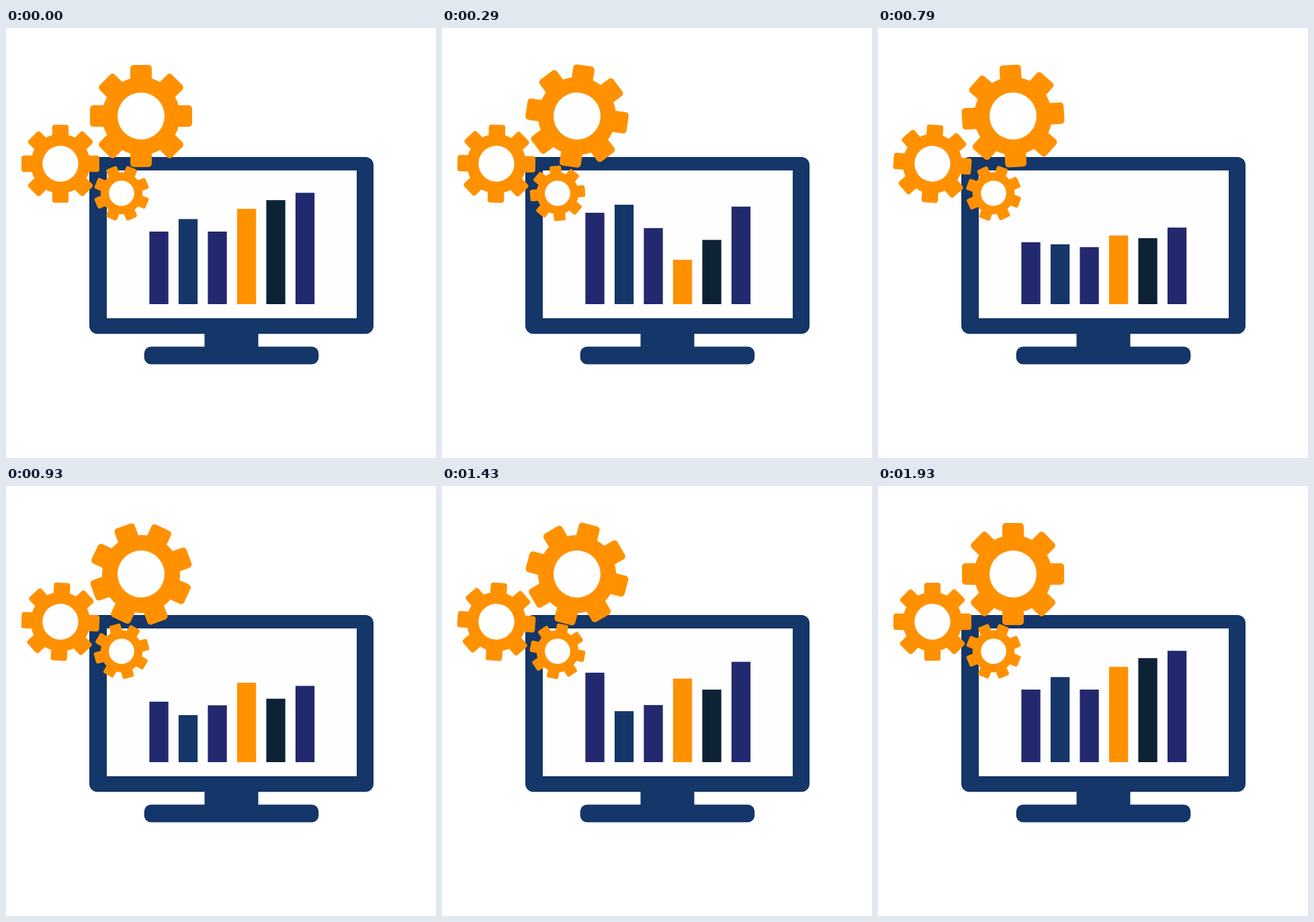
Recreate the animation shown at these times as an HTML page. Size 640 px wide and 640 px high, loop 2 s.

```html
<!DOCTYPE html>
<html lang="en">
<head>
<meta charset="utf-8">
<title>Dashboard</title>
<style>
html, body { margin: 0; width: 100%; height: 100%; overflow: hidden; background: #fff; }
svg { display: block; width: 100vw; height: 100vh; }
</style>
</head>
<body>
<svg id="stage" viewBox="0 0 640 640">
  <g fill="#143668">
    <rect x="124" y="192" width="423" height="263.3" rx="12"/>
    <rect x="295.5" y="450" width="80" height="30"/>
    <rect x="205.7" y="474.2" width="259.6" height="26.2" rx="10"/>
  </g>
  <rect x="150" y="212" width="372" height="220" fill="#fefefe"/>
</svg>
<script>
const LOOP = 2000, STEPS = 28, BASE = 411;
const INDIGO = '#23296e', NAVY = '#143668', ORANGE = '#ff9100', DARK = '#0d2235';
const KEYS = [0, 4, 8, 13, 17, 23, 27];
const stage = document.getElementById('stage');

function add(parent, tag, attrs) {
  const el = document.createElementNS('http://www.w3.org/2000/svg', tag);
  for (const k in attrs) el.setAttribute(k, attrs[k]);
  return parent.appendChild(el);
}

// Each bar glides between six heights and back to the first
function bar(i, fill, ...heights) {
  const el = add(stage, 'rect', { x: 213.4 + 43.5 * i, width: 28.3, fill });
  return { el, heights: [...heights, heights[0]] };
}
const bars = [
  bar(0, INDIGO, 108, 136, 95.3, 90, 121.6, 144.7),
  bar(1, NAVY, 126.6, 148, 117.5, 70, 54.4, 97.3),
  bar(2, INDIGO, 108, 113.2, 85.2, 84.6, 95.4, 74.5),
  bar(3, ORANGE, 141.8, 66, 78, 118.2, 136.8, 112),
  bar(4, DARK, 154.8, 95.6, 104, 94.4, 84.6, 131.3),
  bar(5, INDIGO, 165.7, 145.2, 114.6, 113.5, 137, 161.7)
];

// All sizes follow from the reach of the teeth
function gear(x, y, reach, speed, phase = 0) {
  const el = add(stage, 'g', { fill: ORANGE });
  const hole = reach * 0.46, tooth = reach * 0.42;
  for (let i = 0; i < 8; i++) add(el, 'rect', {
    x: -tooth / 2, y: -reach, width: tooth, height: reach - hole, rx: reach / 15,
    transform: `rotate(${45 * i})`
  });
  add(el, 'circle', { r: reach * 0.763 });
  add(el, 'circle', { r: hole, fill: '#fff' });
  return { el, x, y, speed, phase };
}
const gears = [
  gear(201, 131, 76, 4),
  gear(81, 202, 58, -5),
  gear(172, 246, 41, 3, 22.5)
];

// One shaft drives every gear; it turns five teeth per loop, slightly unevenly
const shaft = [0, 35.8, 61.6, 107.5, 133.2, 189.2, 225];

function at(values, step) {
  const i = Math.max(0, KEYS.findIndex(k => k >= step) - 1);
  return values[i] + (values[i + 1] - values[i]) * (step - KEYS[i]) / (KEYS[i + 1] - KEYS[i]);
}

const start = performance.now();
function draw() {
  const t = (performance.now() - start) % LOOP;
  // Steps fall on times rounded to 10 ms
  const step = Math.floor((t + 5) * STEPS / LOOP) % STEPS;
  for (const { el, heights } of bars) {
    const h = at(heights, step);
    el.setAttribute('y', BASE - h);
    el.setAttribute('height', h);
  }
  const turn = at(shaft, step);
  for (const { el, x, y, speed, phase } of gears)
    el.setAttribute('transform', `translate(${x} ${y}) rotate(${phase + speed * turn})`);
  requestAnimationFrame(draw);
}
draw();
</script>
</body>
</html>
```
